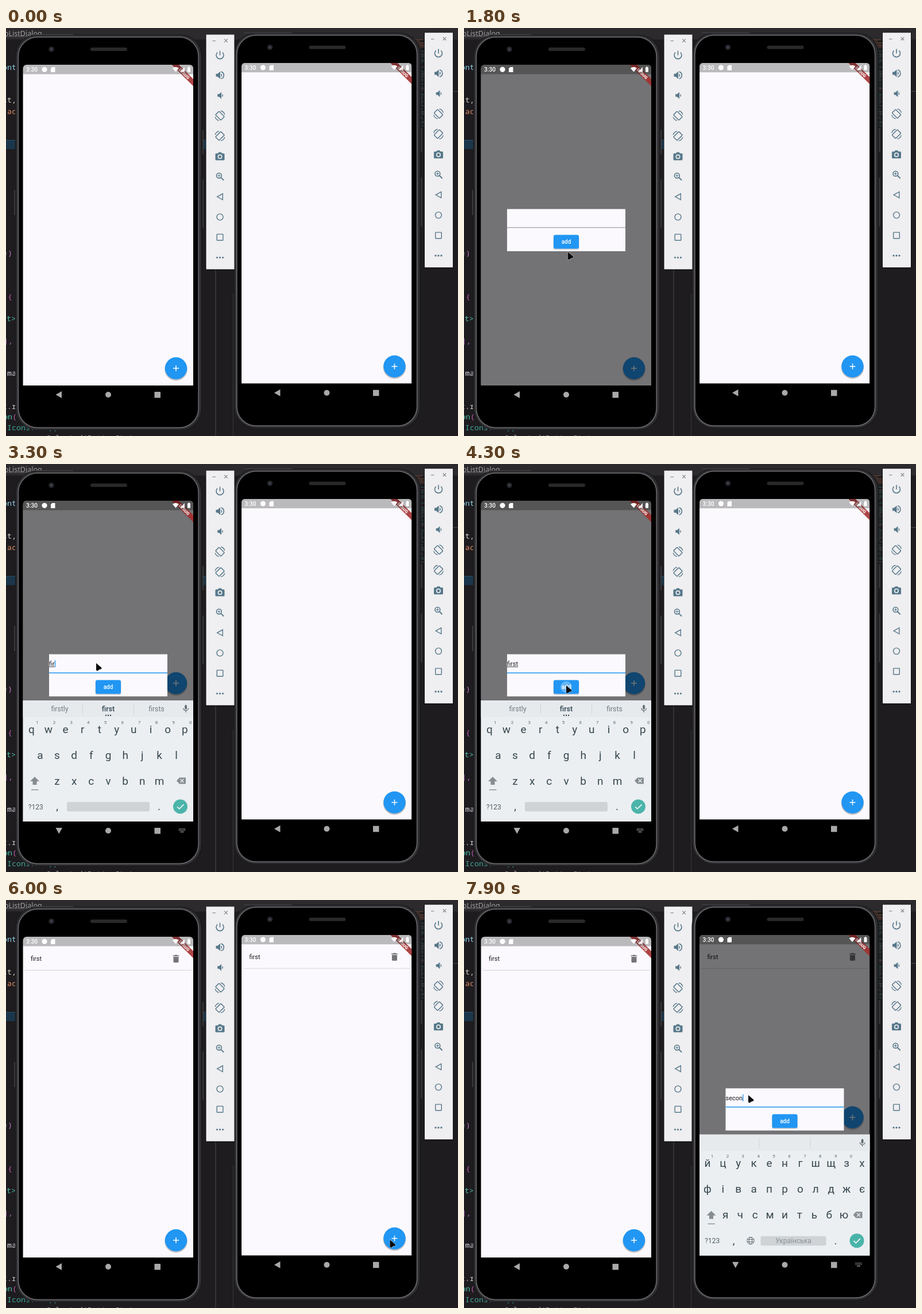
Write an HTML page that moves like this. It is 787 by 711 pixels and loops after 8 s.

```html
<!DOCTYPE html>
<html lang="en">
<head>
<meta charset="utf-8">
<title>List sync on two phones</title>
<style>
  html, body { margin: 0; width: 100%; height: 100%; overflow: hidden; background: #1e1c1f; }
  svg { display: block; width: 787px; height: 711px; font-family: Roboto, sans-serif; }
  .code { font: 13.3px "Noto Sans Mono", monospace; white-space: pre; }
  .mid { text-anchor: middle; }
  .key { font-size: 19px; fill: #37474f; text-anchor: middle; }
  .digit { font-size: 8px; fill: #5f6c73; text-anchor: middle; }
  .hint { font-size: 12.3px; fill: #6f7b82; text-anchor: middle; }
  .tool { fill: none; stroke: #56788a; stroke-width: 1.6; }
  .tool .solid { fill: #56788a; stroke: none; }
</style>
</head>
<body>
<svg id="stage" viewBox="0 0 787 711" xmlns="http://www.w3.org/2000/svg"></svg>
<script>
const LOOP = 8000, STEP = 100;
const SHIFT = [380.5, -3.3];
const RAISE = 6200; // the right window comes to the front
const stage = document.getElementById('stage');

// Piecewise linear lookup: rows of [time, value, ...]
function at(rows, t) {
  let i = 0;
  while (i < rows.length - 1 && rows[i + 1][0] <= t) i++;
  const a = rows[i], b = rows[i + 1];
  if (!b || t <= a[0]) return a.slice(1);
  const k = (t - a[0]) / (b[0] - a[0]);
  return a.slice(1).map((v, n) => v + (b[n + 1] - v) * k);
}
const rect = (x, y, w, h, fill, more = '') =>
  `<rect x="${x}" y="${y}" width="${w}" height="${h}" fill="${fill}" ${more}/>`;
const text = (x, y, s, more = '') => `<text x="${x}" y="${y}" ${more}>${s}</text>`;
const path = (d, more = '') => `<path d="${d}" ${more}/>`;
const circle = (x, y, r, more = '') => `<circle cx="${x}" cy="${y}" r="${r}" ${more}/>`;
const group = (x, y, body, more = '') => `<g transform="translate(${x} ${y})" ${more}>${body}</g>`;

function minimap() {
  let seed = 7, out = '';
  const rnd = () => (seed = seed * 16807 % 2147483647) / 2147483647;
  for (let y = 20; y < 172; y += 2.5) {
    const color = y < 34 ? '#8a5340' : rnd() < .8 ? '#2f6460' : '#5b5b5e';
    out += rect(709 + rnd() * 10, y, 6 + rnd() * 12, 1, color, 'opacity=".75"');
  }
  return out;
}

function editor() {
  const lines = [
    [-6, 73, 'ont', '#8ccfe4'], [-6, 130, 'st,', '#d8d0c4'], [2, 150, 'ac', '#dd8a62'],
    [-6, 397, 'e', '#7d7a80'], [3, 397, ')', '#c678c8'], [3, 473, '{', '#c25bb0'],
    [-7, 511, 'ct&gt;', '#4fbfa8'], [-4, 550, '],', '#b765c8'], [2, 606, 'ma', '#d6d2da'],
    [-6, 664, 't.r', '#c9c6cc'], [-5, 682, 'on', '#4fbfa8'], [11, 682, '(', '#c25bb0'],
    [2, 701, 'Icons.add),', '#3fa596'], [54, 719, 'onSelected(ButtonState', '#9b989e']
  ];
  return rect(0, 0, 787, 711, '#1e1c1f') + rect(0, 0, 787, 20, '#2c2a2d') +
    text(-3, 14, 'oListDialog', 'fill="#a19fa3" font-family="Noto Sans, sans-serif" font-size="12.5"') +
    path('M0 15H64', 'stroke="#777579" stroke-dasharray="2 1"') +
    rect(0, 195, 348, 16, '#1b364a') + rect(0, 195, 348, 1, '#28506b') +
    rect(14.5, 282, 1, 44, '#5a585c') + rect(364.5, 400, 1, 311, '#4b494d') +
    rect(395, 463, 1, 248, '#39373b') + rect(778, 110, 9, 1, '#4b494d') +
    lines.map(([x, y, s, c]) => text(x, y, s, `class="code" fill="${c}"`)).join('') + minimap();
}

function toolbar() {
  const turn = '<rect x="-4.4" y="-6.6" width="8.8" height="13.2" rx="1" transform="rotate(-45)" stroke-width="1.5"/>' +
    path('M1.5 -8.4A8.6 8.6 0 0 1 8.3 -2M-1.5 8.4A8.6 8.6 0 0 1 -8.3 2', 'stroke-width="1.3"');
  const speaker = path('M-7 -2.5h3L.5 -6.5V6.5L-4 2.5h-3Z', 'class="solid"') +
    path('M2 -3.4Q5.5 0 2 3.4Z', 'class="solid"');
  const icons = [
    path('M-4.4 -4.4A6.5 6.5 0 1 0 4.4 -4.4M0 -7.2V.5'),
    speaker + path('M2 -6.2A6.4 6.4 0 0 1 2 6.2'),
    `<g transform="translate(2 0) scale(.9)">${speaker}</g>`,
    turn,
    `<g transform="scale(-1 1)">${turn}</g>`,
    path('M-6.5 -5h3l1.4 -2h4.2l1.4 2h3q1.5 0 1.5 1.5v9q0 1.5 -1.5 1.5h-13q-1.5 0 -1.5 -1.5v-9q0 -1.5 1.5 -1.5Z', 'class="solid"') +
      circle(0, .8, 3.2, 'stroke="#efeef0"'),
    circle(-1.6, -1.6, 4.4) + path('M1.8 1.8L6.6 6.6', 'stroke-width="2"') +
      path('M-4 -1.6H.8M-1.6 -4V.8', 'stroke-width="1.1"'),
    path('M4.8 -5.3V5.3L-4.8 0Z', 'stroke-width="1.4"'),
    circle(0, 0, 5.5, 'stroke-width="1.4"'),
    '<rect x="-5.3" y="-5.3" width="10.6" height="10.6" rx=".6" stroke-width="1.4"/>',
    [-5, 0, 5].map(x => circle(x, 0, 1.6, 'class="solid"')).join('')
  ];
  return rect(347.5, 11, 51, 411.5, '#000', 'opacity=".45"') + rect(348.5, 11.5, 49, 409, '#efeef0') +
    path('M359.5 22.5h5.5M380.2 19.2l5.6 5.6m0 -5.6l-5.6 5.6', 'stroke="#7f7d82" stroke-width="1.1" fill="none"') +
    icons.map((s, i) => group(372.5, 47 + 35.3 * i, s, 'class="tool"')).join('');
}

function body() {
  const shell = (x, y, w, h, r, fill, line, sw) =>
    rect(x, y, w, h, fill, `rx="${r}" stroke="${line}" stroke-width="${sw}"`);
  return rect(341.5, 178, 2.5, 42, '#3a393c') + rect(341.5, 264, 2.5, 85, '#3a393c') +
    shell(17, 12.5, 324, 687.5, 37, '#0b0b0c', '#19191b', 2) +
    shell(19.5, 14.5, 318.5, 683.5, 35, '#000', '#2e2e31', 4) +
    shell(21.3, 15.8, 314, 680.8, 33.5, '#000', '#606064', 2) +
    path('M34 11.5H117', 'stroke="#4a494d"') +
    circle(79, 37, 4.8, 'fill="#232429"') + circle(79, 37, 2.2, 'fill="#3d414c"') +
    rect(147, 34, 64, 6, '#29282b', 'rx="3"');
}

function status() {
  return rect(29, 64, 297, 16.5, '#000', 'opacity=".26"') + '<g fill="#fff">' +
    text(35, 76, '3:30', 'font-size="10.2" font-weight="500"') +
    circle(67, 72.3, 4.6) + path('M80.5 68H85.5V77H78V70.5Z') +
    path('M295.5 76.5L290 70Q295.5 66 301 70Z') +
    path('M311 68V76.5H303Z', 'opacity=".9"') +
    rect(316, 68.5, 5, 8.3, '#fff', 'rx=".8"') + rect(317.3, 67.5, 2.4, 2, '#fff') + '</g>';
}

const mic = path('M311.3 421.5a1.8 1.8 0 0 1 3.6 0v4.5a1.8 1.8 0 0 1 -3.6 0Z', 'fill="#5f6a70"') +
  path('M308.8 425.5a4.3 4.3 0 0 0 8.6 0M313.1 430v3', 'fill="none" stroke="#5f6a70" stroke-width="1.2"');

function keyboard(cyrillic) {
  const row = (s, x, gap, y) => [...s].map((c, i) => text(x + gap * i, y, c, 'class="key"')).join('');
  const first = cyrillic ? [43.5, 26.9, 8] : [44.3, 29.67, 10];
  let out = rect(29.6, 412, 296.4, 211, '#eceff1') + rect(29.6, 412, 296.4, 29, '#e7eaed') +
    path('M133.5 418V436M222.5 418V436', 'stroke="#cfd5d9"') + mic;
  for (let i = 0; i < 10; i++)
    out += text(first[0] + first[1] * i + first[2], 452.5, (i + 1) % 10, 'class="digit"');
  out += cyrillic
    ? row('йцукенгшщзх', 43.5, 26.9, 468.5) + row('фівапролджє', 43.5, 26.9, 513.5) + row('ячсмитьбю', 74.7, 25.8, 558.5)
    : row('qwertyuiop', 44.3, 29.67, 468.5) + row('asdfghjkl', 59.3, 29.67, 513.5) + row('zxcvbnm', 89, 29.67, 558.5);
  out += path('M50 545l8 8h-4.5v6h-7v-6h-4.5Z', 'fill="#858d92"') + rect(44, 567, 12.5, 1.4, '#858d92') +
    path('M302 546.5H313V557.5H302L297 552Z', 'fill="#858d92"') +
    path('M303.5 549l6 6m0 -6l-6 6', 'stroke="#eceff1" stroke-width="1.4"') +
    text(51.8, 601.5, '?123', 'class="mid" font-size="12" fill="#505d64"') +
    text(89, 603, ',', 'class="key"') + text(266.5, 603, '.', 'class="key"') +
    circle(303.5, 597, 12.5, 'fill="#4bb4aa"') +
    path('M298 597.2l3.8 3.8l7.6 -7.6', 'fill="none" stroke="#fff" stroke-width="1.5"');
  if (!cyrillic) return out + rect(106, 589, 144, 16.5, '#cfd3d6', 'rx="2.5"');
  return out + '<g fill="none" stroke="#5f6a70">' + circle(118.5, 597, 6.2) +
    '<ellipse cx="118.5" cy="597" rx="2.8" ry="6.2"/>' + path('M112.5 595h12M112.5 599h12') + '</g>' +
    rect(136, 589, 114, 16.5, '#cfd3d6', 'rx="2.5"') +
    text(193, 601.5, 'Українська', 'class="mid" font-size="12" fill="#8a9196"');
}

const hints = text(93.5, 431, 'firstly', 'class="hint"') +
  text(178, 431, 'first', 'class="hint" font-weight="700" style="fill:#455a64"') +
  text(262, 431, 'firsts', 'class="hint"') +
  [-4, 0, 4].map(x => circle(178 + x, 438, 1.2, 'fill="#37474f"')).join('');

const keyIcon = path('M301 636h11M301 638.5h11', 'stroke="#a9a9a9" stroke-width="1.3" stroke-dasharray="1.4 1"') +
  path('M303.5 641.2h6', 'stroke="#a9a9a9" stroke-width="1.2"');

function phone(id) {
  const fab = circle(0, 2, 20, 'fill="#000" opacity=".1"') + circle(0, 1.5, 19.6, 'fill="#000" opacity=".16"') +
    circle(0, 0, 19.2, 'fill="#2196f3"') + circle(-4, 0, 10, 'data-id="fabSplash" fill="#fff" opacity="0"') +
    path('M-5 0H5M0 -5V5', 'stroke="#fff" stroke-width="1.5"');
  const card = rect(31.5, 82.5, 293.5, 40.5, '#000', 'rx="3.5" opacity=".15"') +
    rect(31.5, 81, 293.5, 41, '#fbf9fd', 'rx="3"') +
    text(43, 106.3, 'first', 'font-size="11" fill="#1b1b1d"') +
    path('M291.5 99H300.5V107.5Q300.5 109 299 109H293Q291.5 109 291.5 107.5ZM290.5 96.6h3l1 -1h3l1 1h3v1.5h-11Z', 'fill="#757477"');
  const dialog = rect(75, 315.5, 206, 73.5, '#fbf9fd') +
    rect(75, 347.3, 206, 1, '#8c8a8e', 'data-id="line"') +
    text(75, 336.3, '', 'data-id="field" font-size="11" fill="#1b1b1d"') +
    rect(75, 337, 0, .8, '#1b1b1d', 'data-id="compose"') +
    rect(75, 326, 1.3, 12, '#2196f3', 'data-id="caret"') +
    rect(155.5, 362, 45, 24, '#000', 'rx="3" opacity=".2"') +
    rect(156, 360.5, 44, 24, '#2196f3', 'rx="3"') +
    text(178, 376, 'add', 'class="mid" font-size="10" font-weight="500" fill="#fff"') +
    circle(178, 372.5, 9, 'data-id="addSplash" fill="#fff" opacity="0"');
  const banner = '<g transform="translate(326 64) rotate(45)">' + rect(-45, 17.7, 90, 8.7, '#a32d2d', 'opacity=".88"') +
    text(0, 24.7, 'DEBUG', 'class="mid" font-size="7.3" font-weight="900" fill="#fff"') + '</g>';
  const nav = path('M97 633V645L86.5 639Z', 'data-id="back"') + path('M86.5 634H98L92.2 644.5Z', 'data-id="down"') +
    circle(178, 639, 5) + rect(258.5, 634, 10.5, 10.5, '#a9a9a9');
  return body() +
    `<clipPath id="screen${id}"><path d="M29.6 623V71Q29.6 64 36.6 64H319Q326 64 326 71V623Z"/></clipPath>` +
    `<clipPath id="lower${id}"><rect x="29" y="64" width="298" height="592"/></clipPath>` +
    `<g clip-path="url(#screen${id})">` + rect(29, 64, 297, 559, '#fbf9fd') +
    `<g data-id="card">${card}</g><g data-id="fab">${fab}</g>` +
    rect(29, 64, 297, 559, '#000', 'data-id="scrim"') +
    `<g data-id="dialog">${dialog}</g>` + banner + status() + '</g>' +
    `<g fill="#a9a9a9">${nav}<g data-id="keyIcon">${keyIcon}</g></g>` +
    `<g clip-path="url(#lower${id})"><g data-id="keys">${keyboard(id === 1)}<g data-id="hints">${hints}</g></g></g>`;
}

const arrow = path('M0 0L9.3 8V10.2Q5 10.4 2.6 13.6L0 12.6Z',
  'fill="#0b0b0c" stroke="#f4f4f4" stroke-opacity=".55" stroke-width="1.2" paint-order="stroke"');

stage.innerHTML = editor() +
  group(0, 0, phone(0) + toolbar(), 'id="p0"') +
  group(...SHIFT, phone(1) + toolbar(), 'id="p1"') + `<g id="pointer">${arrow}</g>`;

const phones = [0, 1].map(i => document.getElementById('p' + i));
const parts = phones.map(el => {
  const map = {};
  el.querySelectorAll('[data-id]').forEach(e => map[e.dataset.id] = e);
  return map;
});
const pointer = document.getElementById('pointer');

const pointerPath = [
  [400, 345, 722], [900, 290, 594], [1300, 290, 594], [1500, 252, 520], [1900, 157, 347], [3700, 157, 347],
  [4100, 178, 386], [4400, 178, 386], [4800, 216, 426], [5300, 420, 520], [5900, 668, 592],
  [6300, 670, 593], [6500, 600, 500], [6800, 487, 346], [7200, 487, 346], [7500, 495, 340]
];
const scripts = [
  {
    fade: [[1100, 0], [1200, .57], [1300, 1], [4300, 1], [4400, .55], [4500, 0]],
    keys: [[2200, 215], [2300, 80], [2400, 9], [2500, 0], [4400, 0], [4500, 60], [4600, 250]],
    fab: [[2200, 0], [2300, -70], [2400, -165], [2500, -211], [4400, -211], [4500, -150], [4600, -40], [4700, 0]],
    drop: [[2200, 0], [2400, 16]],
    typed: [[2900, 'f'], [3100, 'fi'], [3200, 'fir'], [3400, 'firs'], [3600, 'first']],
    open: [2300, 4500], card: 4500, fabTap: 1100, addTap: 4200, caretOff: 4100, compose: true
  },
  {
    fade: [[6200, 0], [6300, .57], [6400, 1]],
    keys: [[7100, 215], [7200, 80], [7300, 9], [7400, 0]],
    fab: [[7100, 0], [7200, -70], [7300, -165], [7400, -211]],
    drop: [[7100, 0], [7300, 16]],
    typed: [[7500, 's'], [7600, 'se'], [7700, 'seco'], [7900, 'secon']],
    open: [7200, LOOP], card: 4700, fabTap: 6200, addTap: LOOP, caretOff: LOOP, compose: false
  }
];

const set = (el, attrs) => { for (const k in attrs) el.setAttribute(k, attrs[k]); };
const show = (el, on) => set(el, { visibility: on ? 'visible' : 'hidden' });

function splash(el, age, alpha) {
  const on = age >= 0 && age < 300;
  set(el, { opacity: on ? alpha : 0, r: on ? 6 + age / 25 : 0 });
}

function drawPhone(p, s, t) {
  const [fade] = at(s.fade, t), [slide] = at(s.keys, t), [lift] = at(s.fab, t), [drop] = at(s.drop, t);
  const open = t >= s.open[0] && t < s.open[1];
  const word = s.typed.filter(r => r[0] <= t).map(r => r[1]).pop() || '';
  set(p.scrim, { opacity: fade * .54 });
  set(p.dialog, { opacity: fade ** 1.3, transform: `translate(0 ${drop})` });
  set(p.fab, { transform: `translate(296 ${593 + lift})` });
  set(p.keys, { transform: `translate(0 ${slide})` });
  show(p.keys, slide < 212);
  show(p.hints, s.compose && word && slide < 212);
  show(p.card, t >= s.card);
  show(p.back, !open);
  show(p.down, open);
  show(p.keyIcon, open);
  set(p.line, { fill: open ? '#2196f3' : '#8c8a8e', height: open ? 1.5 : 1 });
  p.field.textContent = word;
  const width = word ? p.field.getComputedTextLength() : 0;
  set(p.compose, { width: s.compose ? width : 0 });
  set(p.caret, { x: 75 + width });
  show(p.caret, open && t < s.caretOff);
  splash(p.fabSplash, t - s.fabTap, .16);
  splash(p.addSplash, t - s.addTap, .3);
}

function draw(now) {
  const t = Math.floor(now % LOOP / STEP) * STEP;
  scripts.forEach((s, i) => drawPhone(parts[i], s, t));
  const front = phones[t < RAISE ? 0 : 1];
  if (pointer.previousElementSibling !== front) stage.insertBefore(front, pointer);
  set(pointer, { transform: `translate(${at(pointerPath, t).join(' ')})` });
  show(pointer, t >= 400);
}

const start = performance.now();
function tick() {
  draw(performance.now() - start);
  requestAnimationFrame(tick);
}
tick();
</script>
</body>
</html>
```
